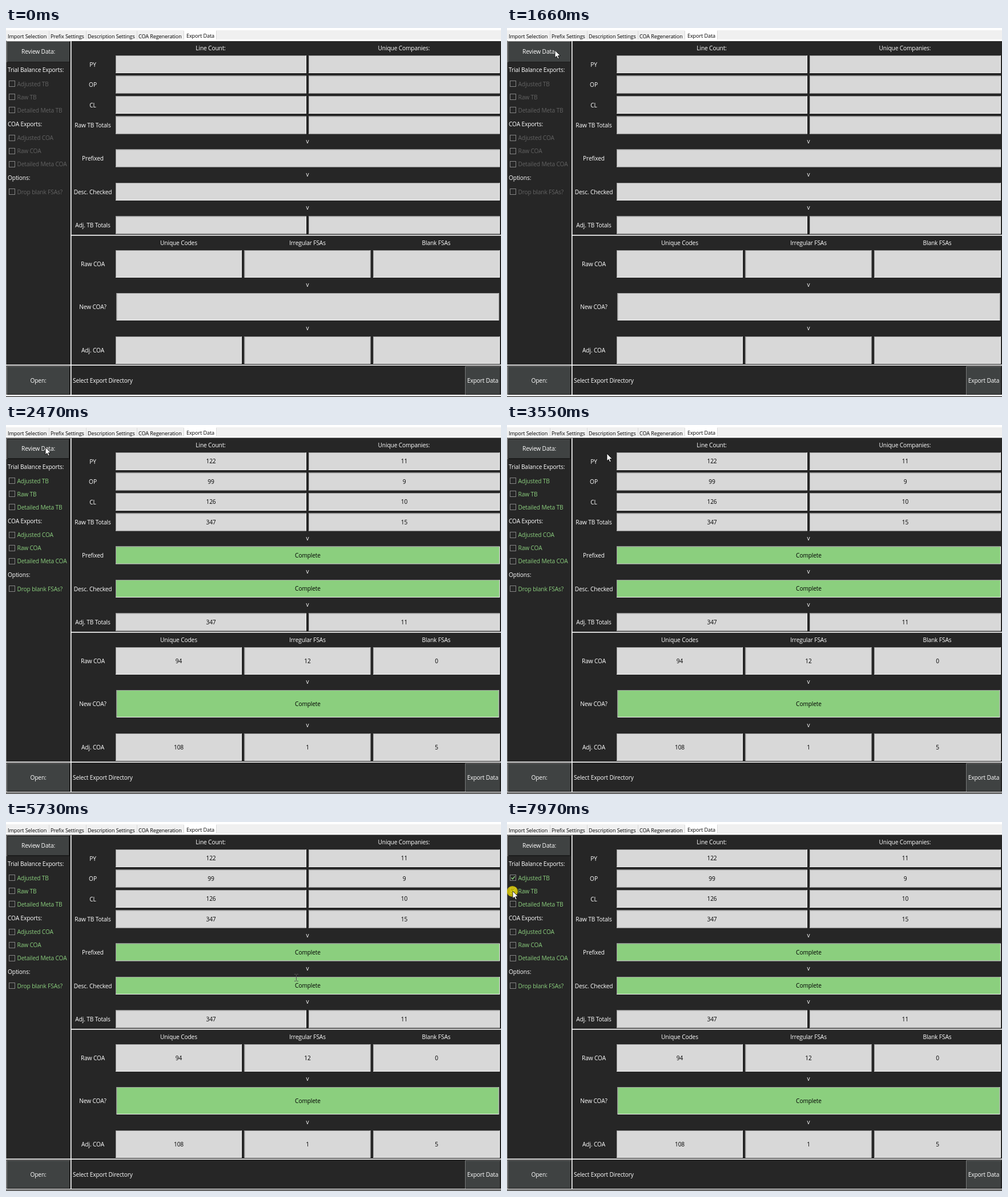
Write an HTML page that moves like this. It is 867 by 646 pixels and loops after 8 s.

```html
<!DOCTYPE html>
<html lang="en">
<head>
<meta charset="utf-8">
<title>Export Data</title>
<style>
  html, body { margin: 0; width: 100%; height: 100%; overflow: hidden; background: #262626; }
  svg { display: block; width: 867px; height: 646px; }
  text { font: 10.2px "Open Sans", "Noto Sans", sans-serif; letter-spacing: -.14px; fill: #fff; white-space: pre; }
  .mid { text-anchor: middle; }
  .tab { font-size: 9.1px; letter-spacing: -.1px; }
  .dark { fill: #000; }
</style>
</head>
<body>
<svg id="stage" viewBox="0 0 867 646"></svg>
<script>
const stage = document.getElementById('stage');
const LOOP = 8000, PRESS = 2390, LOADED = 2470;
const BG = '#262626', CELL = '#d8d8d8', GREEN = '#8bcf7e', BUTTON = '#3f4242';

function add(tag, attrs, text) {
  const el = document.createElementNS('http://www.w3.org/2000/svg', tag);
  for (const key in attrs) el.setAttribute(key, attrs[key]);
  if (text) el.textContent = text;
  return stage.appendChild(el);
}
const rect = (x, y, width, height, fill) => add('rect', { x, y, width, height, fill });
const label = (text, x, y, cls = 'mid') => add('text', { x, y: y + 3.7, class: cls }, text);
const show = (el, on) => el.setAttribute('visibility', on ? 'visible' : 'hidden');

// Tab strip
rect(0, 0, 867, 646, BG);
rect(0, 0, 867, 23, '#fff');
rect(0, 4, 311, 16, '#f0f0f0');
rect(368, 4, 499, 16, '#f0f0f0');
for (const x of [75, 140, 229, 311, 368]) rect(x, 5, 1, 15, '#d9d9d9');
[['Import Selection', 3], ['Prefix Settings', 78], ['Description Settings', 143], ['COA Regeneration', 232]]
  .forEach(([text, x]) => label(text, x, 14, 'tab dark'));
label('Export Data', 316, 13, 'tab dark');

// Dividers and frame
rect(0, 22, 1, 620, '#777');
rect(113, 23, 1.6, 619, '#fff');
rect(114, 362, 753, 1.6, '#fff');
rect(0, 589.4, 867, 1.6, '#fff');
rect(0, 642, 867, 2, '#fff');
rect(0, 644, 867, 1, '#c8c8c8');
const focusLines = [rect(0, 22, 867, 1, '#777'), rect(0, 643, 867, 1, BG)];

// Buttons
function button(text, x, y, w, h) {
  rect(x, y, w, h, '#777');
  rect(x + 1, y + 1, w - 1, h - 1, '#1c1c1c');
  const face = rect(x + 1, y + 1, w - 2, h - 2, BUTTON);
  return { face, text: label(text, x + w / 2, y + h / 2) };
}
const review = button('Review Data:', 1, 23, 111, 37);
button('Open:', 1, 592, 111, 50);
button('Export Data', 804, 592, 62, 50);
const focusRing = add('rect', { x: 2.5, y: 24.5, width: 108, height: 34, fill: 'none', stroke: '#1c1c1c' });
label('Select Export Directory', 117, 617, '');

// Side panel
label('Trial Balance Exports:', 3, 73, '');
label('COA Exports:', 3, 168, '');
label('Options:', 3, 262.5, '');
const options = [['Adjusted TB', 97.5], ['Raw TB', 120.5], ['Detailed Meta TB', 143.5], ['Adjusted COA', 192],
  ['Raw COA', 215], ['Detailed Meta COA', 238], ['Drop blank FSAs?', 286.5]].map(([text, y]) => {
  const top = Math.floor(y) - 4.5;
  add('rect', { x: 5.5, y: top, width: 10, height: 10, fill: BG, stroke: '#858585' });
  const tick = add('path', { d: `M7.5 ${top + 5}l2.3 2.5 4-5`, fill: 'none', stroke: GREEN, 'stroke-width': 1.4 });
  return { tick, text: label(text, 19.5, y + .5, '') };
});

// Result cells
const cells = [], values = [], bars = [];
function cell(x, y, right, h, value) {
  const w = right - x;
  cells.push([x, y, right, y + h]);
  rect(x, y, w, h, '#f4f4f4');
  rect(x, y, w - 1, h - 1, '#9c9c9c');
  const face = rect(x + 1, y + 1, w - 2, h - 2, CELL);
  values.push(label(value, x + w / 2, y + h / 2 - .2, 'mid dark'));
  if (value === 'Complete') bars.push(face);
}
function row(name, y, h, edges, data) {
  label(name, 152, y + h / 2 + .5);
  data.forEach((value, i) => cell(edges[2 * i], y, edges[2 * i + 1], h, value));
}
const two = [192, 526, 530, 865], one = [192, 865], three = [192, 413, 417.5, 638.5, 643, 865];
label('Line Count:', 358.5, 35);
label('Unique Companies:', 697, 35);
row('PY', 48, 31, two, ['122', '11']);
row('OP', 83.5, 31, two, ['99', '9']);
row('CL', 119, 31, two, ['126', '10']);
row('Raw TB Totals', 154.5, 31, two, ['347', '15']);
row('Prefixed', 212.5, 31, one, ['Complete']);
row('Desc. Checked', 271, 31, one, ['Complete']);
row('Adj. TB Totals', 329.5, 31, two, ['347', '11']);
['Unique Codes', 'Irregular FSAs', 'Blank FSAs'].forEach((text, i) => label(text, 302.5 + 225.5 * i, 376));
row('Raw COA', 389, 48, three, ['94', '12', '0']);
row('New COA?', 464, 48, [193.5, 863.5], ['Complete']);
row('Adj. COA', 540, 48, three, ['108', '1', '5']);
for (const y of [198, 256.5, 314.5, 449.5, 525]) label('v', 528, y);

// Pointer
const halo = add('circle', { r: 9.6, fill: '#ffeb00', opacity: .7 });
const arrow = add('path', { d: 'M0 0V13L3 10.3 5 15 7.2 14 5.2 9.5H9.4Z', fill: '#fff', stroke: '#000', 'stroke-width': .8 });
const beam = add('path', { d: 'M-3.5-6H-1L0-5 1-6H3.5M0-5V5M-3.5 6H-1L0 5 1 6H3.5', fill: 'none', stroke: '#555' });

// Time, x, y of the pointer's hot spot
const path = [
  [200, 793, 629], [550, 560, 480], [940, 275, 261], [970, 251, 218], [1100, 188, 140], [1300, 130, 78],
  [1500, 97, 48], [1820, 76, 35], [2060, 69, 39], [3100, 69, 39], [3550, 175, 50], [3870, 296, 52],
  [4300, 520, 88], [4550, 571, 121], [4720, 563, 145], [5250, 482, 216], [5570, 466, 236], [5730, 508, 272],
  [5900, 523, 320], [6080, 498, 362], [6220, 465, 365], [6380, 422, 351], [6600, 270, 285], [6700, 205, 237],
  [6830, 98, 126], [6950, 50, 106], [7180, 13, 94], [7490, 13, 94], [7690, 10, 121], [8000, 10, 121]
];
function slope(i, k) {
  const a = path[i - 1], b = path[i], c = path[i + 1];
  const rests = (p, q) => p[1] === q[1] && p[2] === q[2];
  if (!a || !c || rests(a, b) || rests(b, c)) return 0;
  return (c[k] - a[k]) / (c[0] - a[0]);
}
function pointerAt(t) {
  let i = 0;
  while (i < path.length - 2 && t >= path[i + 1][0]) i++;
  const a = path[i], b = path[i + 1], span = b[0] - a[0];
  const u = Math.max(0, (t - a[0]) / span), v = 1 - u;
  return [1, 2].map(k => v * v * (1 + 2 * u) * a[k] + u * u * (1 + 2 * v) * b[k]
    + span * u * v * (v * slope(i, k) - u * slope(i + 1, k)));
}

function draw(t) {
  const pressed = t >= PRESS && t < LOADED, loaded = t >= LOADED;
  focusLines.forEach(el => show(el, t >= PRESS));
  show(focusRing, loaded);
  review.face.setAttribute('fill', pressed ? '#fff' : BUTTON);
  review.text.setAttribute('class', pressed ? 'mid dark' : 'mid');
  review.text.setAttribute('transform', pressed ? 'translate(1 1)' : '');
  values.forEach(el => show(el, loaded));
  bars.forEach(el => el.setAttribute('fill', loaded ? GREEN : CELL));
  options.forEach(({ tick, text }, i) => {
    text.style.fill = loaded ? GREEN : '#626262';
    show(tick, i === 0 && t >= 7440 || i === 1 && t >= 7930);
  });

  const [x, y] = pointerAt(t).map(Math.round);
  const inCell = cells.some(([l, top, r, b]) => x >= l && x < r && y >= top && y < b);
  show(arrow, t >= 200 && !inCell);
  show(beam, t >= 200 && inCell);
  show(halo, pressed || t >= 7400 && t < 7490 || t >= 7890);
  arrow.setAttribute('transform', `translate(${x} ${y})`);
  beam.setAttribute('transform', `translate(${x + .5} ${y + .5})`);
  halo.setAttribute('transform', `translate(${x - .5} ${y + .5})`);
}
function tick() {
  draw(performance.now() % LOOP);
  requestAnimationFrame(tick);
}
tick();
</script>
</body>
</html>
```
